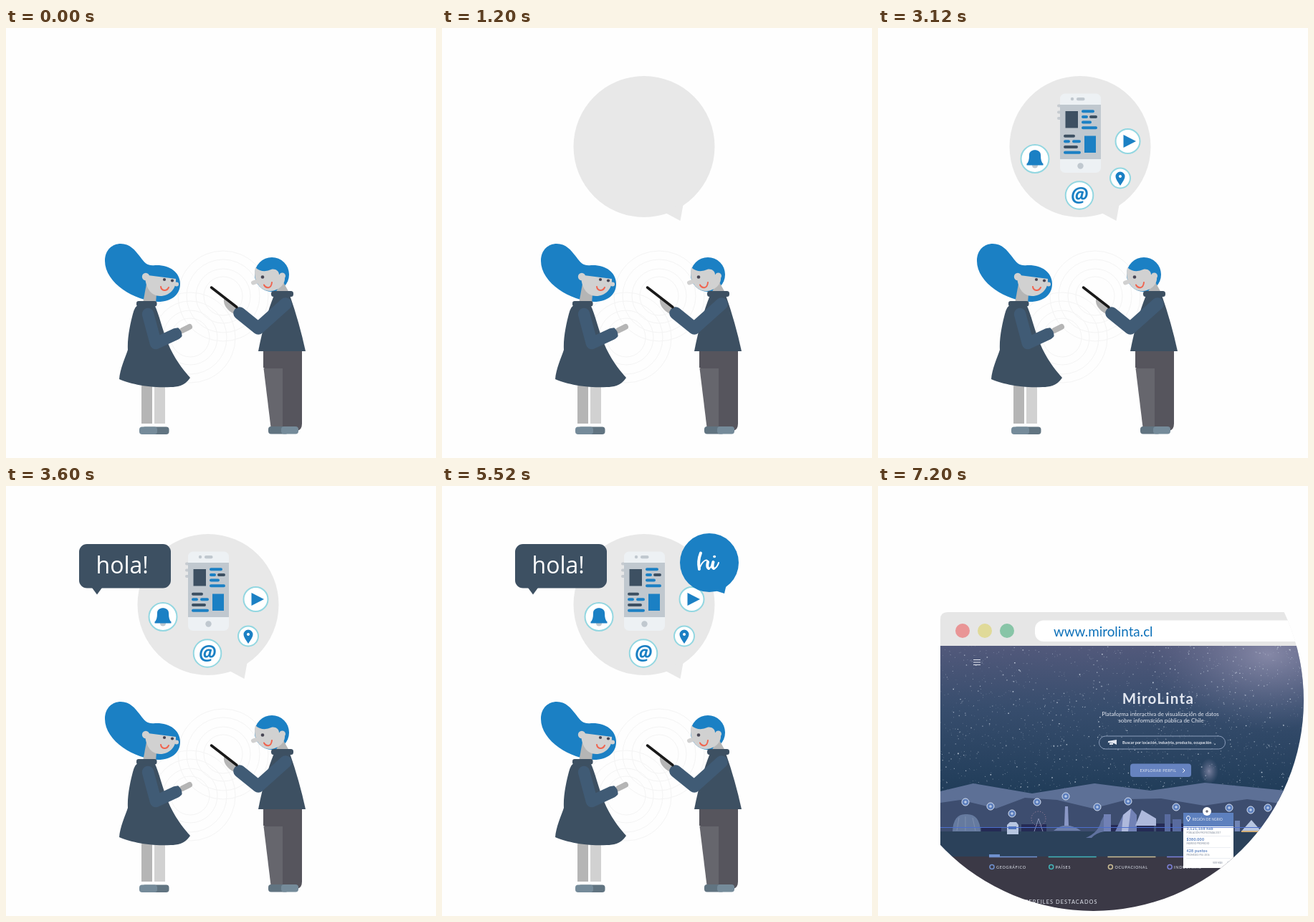
An HTML page for the animation above (8000 ms loop, 600 by 600 pixels).

```html
<!DOCTYPE html>
<html lang="es">
<head>
<meta charset="utf-8">
<title>Conversación</title>
<style>
  html, body { margin: 0; width: 100%; height: 100%; overflow: hidden; background: #fefefe; }
  svg { display: block; width: 100%; height: 100%; }
  .blue { fill: #1b80c4; } .navy { fill: #3d5062; } .skin { fill: #d1d1d1; } .shade { fill: #b5b5b5; }
  .line { fill: none; stroke-linecap: round; stroke-linejoin: round; }
  .sleeve { stroke: #405b75; }
  .mouth { stroke: #f0644f; stroke-width: 2; }
  .badge { fill: #fff; stroke: #93d7e1; stroke-width: 2; }
  .hola { font: 500 32px "Open Sans", sans-serif; fill: #fff; }
  .at { font: italic 700 28px "Open Sans", sans-serif; text-anchor: middle; }
  .url { font: 18.8px Lato, sans-serif; fill: #0b70b9; }
  .site { font-family: Lato, sans-serif; fill: #e3e7f0; }
  .mid { text-anchor: middle; }
</style>
</head>
<body>
<svg viewBox="0 0 600 600">
  <defs>
    <clipPath id="lens"><circle cx="300.500" cy="299.500" r="293.500"/></clipPath>
    <clipPath id="page"><path d="M87 223H600V600H87Z"/></clipPath>
    <linearGradient id="sky" x2="0" y2="1">
      <stop stop-color="#52597b"/><stop offset=".4" stop-color="#374d6d"/><stop offset="1" stop-color="#1e3b57"/>
    </linearGradient>
    <radialGradient id="glow"><stop stop-color="#9c9cb9" stop-opacity=".7"/><stop offset="1" stop-color="#7b7da0" stop-opacity="0"/></radialGradient>
  </defs>

  <g id="people">
    <g id="rings" fill="none" stroke="#f4f4f4"></g>

    <!-- woman -->
    <path class="shade" d="M189 499h15v53h-15z"/><path class="skin" d="M207 499h15v53h-15z"/>
    <rect x="190" y="556.500" width="37.500" height="10.500" rx="4" fill="#617481"/>
    <rect x="186" y="556.500" width="25" height="10.500" rx="4" fill="#758b9a"/>
    <path class="blue" d="M138 325C138 309 149 301 160 301C173 301 180 310 187 319C194 329 198 332 208 331C227 330 243 340 243 357C243 372 231 382 212 382C180 381 138 356 138 325Z"/>
    <path class="shade" d="M196 357L210 371L209 384H191Z"/>
    <path class="skin" d="M194 344.500L237 350C238 364 228 374 215 374C202 374 194 362 194 344.500Z"/>
    <circle class="skin" cx="195" cy="347" r="5.200"/><circle class="skin" cx="238" cy="357.500" r="3"/>
    <circle cx="221" cy="351" r="2.100" fill="#474553"/><circle cx="232" cy="352.500" r="2.100" fill="#474553"/>
    <path class="line mouth" d="M216 361C217 367 224 368 227 362"/>
    <path class="navy" d="M186 386H207C214 400 218 421 226 440C235 462 248 478 257 488C250 499 239 501 230 501C201 503 171 496 158 490C159 476 166 461 170 449C169 432 174 410 177 399Q180 387 186 386Z"/>
    <rect class="navy" x="182" y="381" width="28.500" height="7.500" rx="3"/>
    <path class="line" d="M246 422L256 417" stroke="#b5b5b5" stroke-width="8"/>
    <path class="line sleeve" d="M198 399L209 440L237 427" stroke-width="16.500"/>
    <path class="sleeve line" d="M239 422L242 429" stroke-width="7"/>

    <!-- man -->
    <path d="M359 450H413V552Q413 561 406 562H384L372 480L359 474Z" fill="#56555d"/>
    <path d="M359.500 475H386V557H369.500Z" fill="#66666d"/>
    <rect x="366" y="556" width="28" height="10.500" rx="4" fill="#617481"/>
    <rect x="384" y="556" width="24" height="10.500" rx="4" fill="#758b9a"/>
    <circle class="blue" cx="371" cy="344" r="24"/>
    <path class="shade" d="M386 353L395 369H376Z"/>
    <path class="skin" d="M348 334C354 340 362 340 367 338C374 334 381 338 381 344L389 348C390 359 379 367 368 367C353 367 344 350 348 334Z"/>
    <circle class="skin" cx="385.500" cy="346" r="4.500"/>
    <path class="line" d="M345 355.500L349 354" stroke="#d1d1d1" stroke-width="6"/>
    <circle cx="358" cy="347.500" r="2.300" fill="#474553"/>
    <path class="line mouth" d="M360 358.500C363 364 370 364 371 355"/>
    <path class="navy" d="M374 373H396Q409 410 418 451H352Q361 405 374 373Z"/>
    <rect class="navy" x="370" y="367" width="31" height="8" rx="3.500"/>
    <path class="shade" d="M304 378C308 376 322 389 323 391L318 399C309 394 303 387 304 378Z"/>
    <path class="line sleeve" d="M390 385L352 419L326 398" stroke-width="17.500"/>
    <path class="line" d="M286.500 362L322 389.500" stroke="#191919" stroke-width="3.500"/>
  </g>

  <g id="bubble" fill="#e8e8e8"><circle cx="282" cy="165.500" r="98.500"/><path d="M310 257L332.500 269L337 244Z"/></g>

  <g id="apps">
    <path class="line" d="M252 108.500h5M252 117.500h5M252 126h5" stroke="#c6cbd0" stroke-width="4"/>
    <rect x="254" y="91.500" width="57" height="110.500" rx="7" fill="#edf1f4"/>
    <path d="M254 107h57v76h-57z" fill="#c0c8cf"/>
    <g fill="#c0c8cf"><circle cx="271" cy="99" r="2.200"/><rect x="277" y="97" width="11.500" height="4.200" rx="2"/><circle cx="282.500" cy="192.500" r="4.200"/></g>
    <path class="navy" d="M261.500 116h17.500v23.500h-17.500z"/><path class="blue" d="M288 150.500h16v23.500h-16z"/>
    <g class="line" stroke-width="4">
      <path stroke="#1b80c4" d="M286 116.300h14M286 124h5M286 131.600h10M286 139.300h18M261 158.200h5M273 158.200h8M261 173.700h20"/>
      <path stroke="#3d5062" d="M297 124h7M261 150.700h12M261 166h16"/>
    </g>
    <g class="badge"><circle cx="219" cy="182.500" r="19.500"/><circle cx="348.500" cy="158" r="17"/><circle cx="338" cy="209.500" r="14"/><circle cx="281" cy="233.500" r="19.300"/></g>
    <circle cx="219" cy="191.500" r="4" fill="#c0c8cf"/>
    <path class="blue" d="M207.500 191.500V189.500Q211 187 211 177C211 168 227 168 227 177Q227 187 230.500 189.500V191.500Z"/>
    <path class="blue" d="M342.500 149V167L360 158Z"/>
    <path class="blue" fill-rule="evenodd" d="M338 220C335 215 331.500 211 331.500 207A6.500 6.500 0 0 1 344.500 207C344.500 211 341 215 338 220ZM338 205a2 2 0 1 0 .01 0Z"/>
    <text class="at blue" x="281" y="243">@</text>
  </g>

  <g id="hola">
    <rect class="navy" x="102" y="81" width="128" height="61.500" rx="11"/><path class="navy" d="M120 142h14l-7 9.500z"/>
    <text class="hola" x="125.500" y="121.500">hola!</text>
  </g>

  <g id="hi" aria-label="hi">
    <circle class="blue" cx="373" cy="107" r="41"/><path class="blue" d="M378 145L394 150L397 137Z"/>
    <g class="line" stroke="#fff">
      <path stroke-width="4" d="M361 93.500C358 101 357.500 109 359 116M371 106C370 110 370 114 372 115M378.500 106C377 110 377 114 379 115"/>
      <path stroke-width="2" d="M360 113C364 104 371 100 371 107M372 115.500C375 115 377 110 378.500 106M379 115.500C382 115 385 111 386 107"/>
      <path stroke-width="3.600" d="M380 98.500h.3"/>
    </g>
  </g>

  <path id="question" fill="#0071bd" d="M284 344C281 315 296 287 313 257C320 246 326 235 326 222C324 209 312 200 297 200C280 200 262 209 256 216C254 224 260 234 269 241Q272 242 274 239L279 246C281 251 279 257 271 258C251 260 240 246 239 229C240 210 246 196 259 187C270 177 283 172 295 172C324 173 338 195 346 213C352 230 353 245 348 257C342 273 319 298 308 317C303 327 305 333 305 339C299 345 291 346 284 344ZM283 388C288 383 303 381 307 385C309 389 298 403 292 403C286 403 280 391 283 388Z"/>

  <g id="browser" clip-path="url(#lens)">
    <path d="M87 223V186Q87 176 97 176H600V223Z" fill="#e6e6e6"/>
    <circle cx="118" cy="202" r="10" fill="#e99596"/><circle cx="149" cy="202" r="10" fill="#e0da99"/><circle cx="180" cy="202" r="10" fill="#88c5a7"/>
    <rect x="219" y="187.500" width="400" height="29.500" rx="12" fill="#fff"/>
    <text class="url" x="245" y="210">www.mirolinta.cl</text>
    <g clip-path="url(#page)">
      <path d="M87 223H600V440H87Z" fill="url(#sky)"/>
      <ellipse cx="545" cy="235" rx="165" ry="105" fill="url(#glow)"/>
      <ellipse cx="462" cy="398" rx="13" ry="18" fill="url(#glow)"/>
      <g id="stars" stroke="#d3dde9"></g>
      <path d="M87 426L133 415L215 429L302 415L380 425L456 414L600 428V482H87Z" fill="#5d7096"/>
      <path d="M87 442L115 438L165 450L205 435L250 438L300 450L350 437L395 436L455 446L515 437L600 448V483H87Z" fill="#3d4d6f"/>
      <path d="M87 482H600V517H87Z" fill="#2b415a"/>
      <g id="town">
        <path d="M104 482Q105 457 123 458Q142 457 143 482Z" fill="#657a9f"/>
        <path d="M110 481L113 463M122 481V461M136 481L132 463" stroke="#7d8eae" fill="none"/>
        <path d="M144 482V476H172V482ZM200 482V472H235V482ZM318 482V473H385V482ZM388 482V471H426V482Z" fill="#252b55"/>
        <path d="M180 486V473L184 469H193L196 473V486ZM507 482L521 466L535 482Z" fill="#b7c6e1"/>
        <path d="M182 475h11v4h-11z" fill="#4e74b8"/>
        <circle cx="224" cy="464" r="10" fill="none" stroke="#b58fa9" stroke-dasharray="1 2.500"/>
        <path d="M224 464L218 482M224 464L230 482" stroke="#8790b3"/>
        <path d="M245 481Q262 466 283 481Z" fill="#6d7fab"/><path d="M260 474L261 447H265L266 474Z" fill="#8b98c6"/>
        <path d="M290 491Q308 483 311 468L316 459V482Q304 484 298 491Z" fill="#5f719f"/>
        <path d="M315 482V458H325V482ZM331 482L342 459L353 450L361 459V482Z" fill="#7181b5"/>
        <path d="M342 459L353 450L349 482H340ZM359 474L368 452L388 464V474Z" fill="#aeb9dc"/>
        <path d="M400 482V458H408V482ZM411 482V465H423V482Z" fill="#596b9f"/>
        <path d="M536 482L545 471L560 468L566 482ZM498 482V467H505V482Z" fill="#7185b5"/>
        <path d="M507 482h28" stroke="#d3af78" stroke-width="2"/>
      </g>
      <path d="M87 476.500H600" stroke="#4c6fce"/>
      <path d="M87 517H600V600H87Z" fill="#3b3946"/>
      <path d="M133 242.500h10M133 246h10M133 249.500h10" stroke="#e3e7f0"/>
      <g class="site">
        <text class="mid" x="391" y="304" font-size="20.500" font-weight="700" letter-spacing="1.300">MiroLinta</text>
        <g class="mid" font-size="7.900">
          <text x="394" y="320.500">Plataforma interactiva de visualización de datos</text>
          <text x="395" y="329.500">sobre información pública de Chile</text>
        </g>
        <rect x="308.500" y="349" width="176" height="18" rx="9" fill="none" stroke="#8b9dba"/>
        <path d="M321 356L333 354V361L329 359L321 358ZM323 359h5v2h-5z"/>
        <text x="341" y="360" font-size="5.500" font-weight="700">Buscar por locación, industria, producto, ocupación</text>
        <rect x="352" y="387.500" width="85" height="18.500" rx="4" fill="#6683c0"/>
        <text x="365.500" y="399" font-size="5.300" letter-spacing=".4">EXPLORAR PERFIL</text>
        <path class="line" d="M425.500 394.500l2.500 2.500l-2.500 2.500" stroke="#fff"/>
        <g id="tabs" font-size="5.500" letter-spacing=".65"></g>
        <path d="M155 514h15v4h-15z" fill="#6f91cf"/>
        <text x="205" y="583" font-size="7.400" letter-spacing="1.050">PERFILES DESTACADOS</text>
      </g>
      <g id="pins" fill="#5d7fbd" stroke="#d8e2f2"></g>
      <g class="site">
        <path d="M426 473h70v60h-70z" fill="#fff"/>
        <g font-size="5.200" font-weight="700" fill="#4d78bd" letter-spacing=".3">
          <text x="430.500" y="480">3,121,168 hab</text><text x="430.500" y="495">$380.000</text><text x="430.500" y="511">428 puntos</text>
        </g>
        <g font-size="3.200" fill="#7d8797">
          <text x="430.500" y="485">POBLACIÓN PROYECTADA 2017</text><text x="430.500" y="500">INGRESO PROMEDIO</text><text x="430.500" y="516">PROMEDIO PSU 2016</text><text x="467" y="527">VER MÁS</text>
        </g>
        <path d="M430 488.500h62M430 504.500h62M430 519.500h62" stroke="#e4e7ee" stroke-width=".7"/>
        <path d="M487 525h3M490 523v4" stroke="#9aa5b7" stroke-width=".7"/>
        <path d="M426 456h70v19h-70z" fill="#5d80be"/>
        <path d="M433 468l-2.300-4a2.500 2.500 0 1 1 4.600 0Z" fill="none" stroke="#fff"/>
        <text x="438.500" y="466.500" font-size="4.800">REGIÓN DE NGRIO</text>
        <path d="M426 476.500h70" stroke="#4c6fce" stroke-width=".8"/>
        <circle cx="459" cy="454" r="6" fill="#fff"/><path d="M457 454h4M459 452v4" stroke="#445"/>
      </g>
    </g>
  </g>
</svg>
<script>
const byId = id => document.getElementById(id);
const fill = (id, items, draw) => byId(id).innerHTML = items.map(draw).join('');

let seed = 7;
const random = () => (seed = seed * 16807 % 2147483647) / 2147483647;

const ring = (x, y) => r => `<circle cx="${x}" cy="${y}" r="${r}"/>`;
const radii = [27, 38, 51, 63];
byId('rings').innerHTML = radii.map(ring(257, 432)).join('') + radii.map(ring(303, 374)).join('');

fill('stars', Array(1700).fill(), () => {
  const x = 87 + random() * 507, y = 223 + random() * 205, size = .6 + random() ** 4;
  return `<path d="M${x.toFixed(1)} ${y.toFixed(1)}h${size.toFixed(1)}" stroke-width="${size.toFixed(1)}" opacity="${(.25 + random() * .65).toFixed(2)}"/>`;
});

fill('pins', [[122, 441], [157, 447], [187, 457], [222, 441], [262, 433], [306, 448], [349, 440], [416, 448], [490, 449], [520, 452], [544, 449]],
  ([x, y]) => `<circle cx="${x}" cy="${y}" r="5"/><path d="M${x - 2} ${y}h4M${x} ${y - 2}v4"/>`);

fill('tabs', [['GEOGRÁFICO', '#6f91cf'], ['PAÍSES', '#42b5b9'], ['OCUPACIONAL', '#cbbd94'], ['INDUSTRIAS', '#7c80d8']], ([label, color], i) => {
  const x = 155 + i * 82.7;
  return `<path d="M${x} 517.500h67" stroke="${color}" stroke-width="1.300"/>
    <circle cx="${x + 4}" cy="531.500" r="3" fill="none" stroke="${color}" stroke-width="1.500"/>
    <text x="${x + 10}" y="534">${label}</text>`;
});

// Each part is shown from its start until its end, in ms.
const schedule = {
  people: [0, 6000], bubble: [1200, 6000], apps: [2400, 6000], hola: [3600, 6000],
  hi: [4800, 6000], question: [6000, 7200], browser: [7200, 8000]
};

function render(now) {
  const t = now % 8000;
  for (const [id, [start, end]] of Object.entries(schedule))
    byId(id).style.display = t >= start && t < end ? '' : 'none';
}

function tick() {
  render(performance.now());
  requestAnimationFrame(tick);
}
tick();
</script>
</body>
</html>
```
